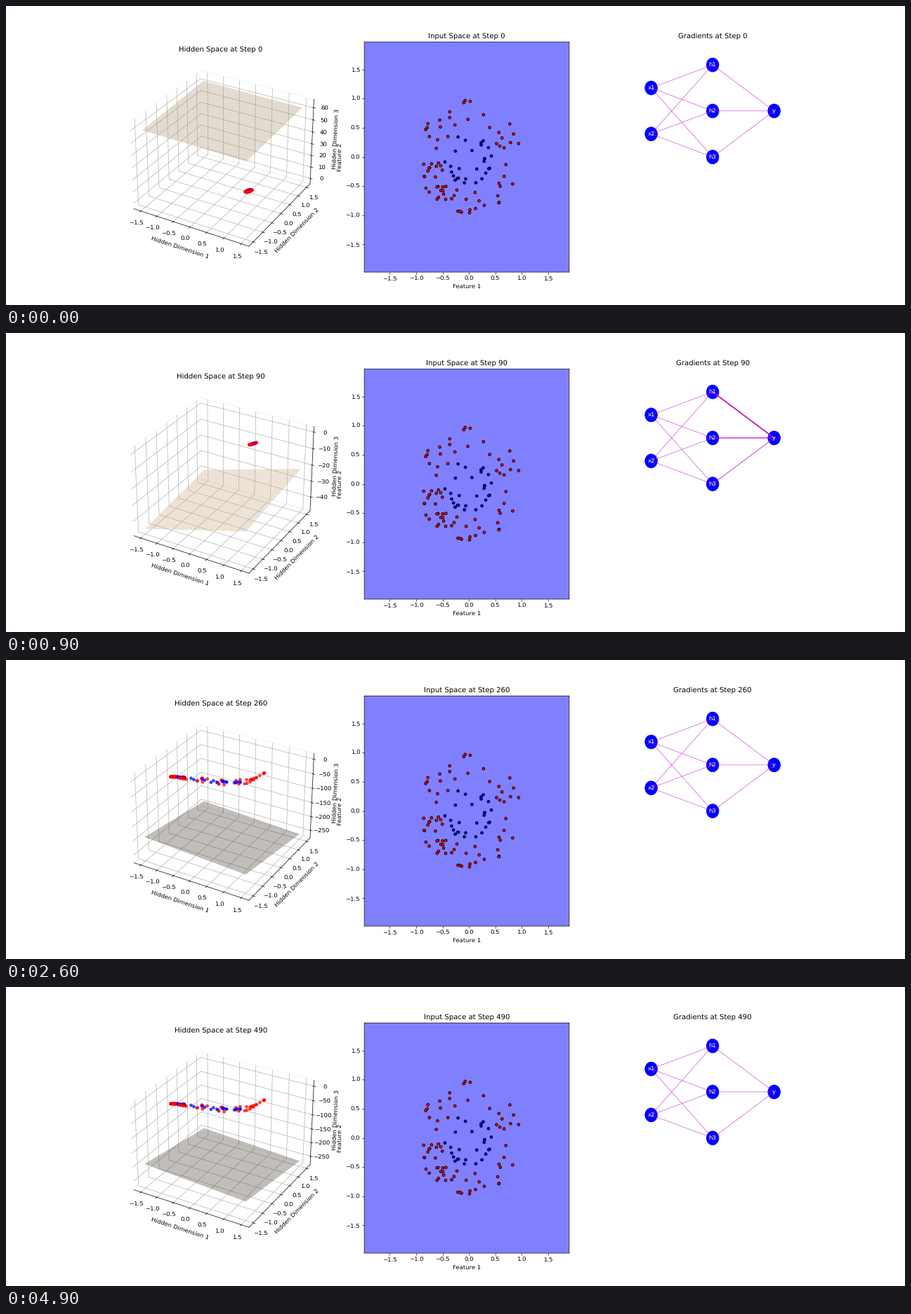
A matplotlib script that plays this animation: 1280 by 427 pixels, repeating every 5000 ms.

```python
import numpy as np
import matplotlib.pyplot as plt
from matplotlib.animation import FuncAnimation

W, H, DPI = 1280, 427, 1280 / 21
FRAMES, INTERVAL, STEP = 50, 100, 10
N_INNER, N_OUTER = 28, 72
THIN = .55
SPAN = 1.719

plt.rcParams.update({'text.hinting': 'none', 'path.snap': False})

# Training milestones; between them the network weights are blended
STEPS = [0, 90, 130, 180, 490]
# Decision plane z = (A + Bx + Cy) / D
PLANE = np.array([(1, -.006, .0165, .0166),
                  (1, -.177, -.0627, -.0299),
                  (-.6, -.113, -.155, -.1008),
                  (-1, -.0298, -.0688, .00448),
                  (-1, -.0298, -.0688, .00438)])
# Gain and offset of the three hidden units
EARLY = (.1, .67, .11, .343, .06, 0)
LATE = (2.4, -.1, 1.38, -.9, .5, 1.6)
UNITS = np.array([EARLY,
                  (.1, .80, .11, .375, .06, 0),
                  (1.85, -.97, .78, -.94, .5, 1.6),
                  LATE, LATE])


def blend(step, rows):
    if step < STEPS[1]:
        step = STEPS[1] * (step / STEPS[1]) ** 2.28
    return np.array([np.interp(step, STEPS, col) for col in rows.T])


def ring(rng, n, inner, outer):
    """Random points on a ring, denser toward the lower left."""
    r = np.sqrt(rng.uniform(inner ** 2, outer ** 2, n))
    t = rng.uniform(0, 2 * np.pi, n)
    t -= .3 * np.sin(t - np.radians(235))
    return np.column_stack([r * np.cos(t), r * np.sin(t)])


def hidden(step):
    spread = 30 * max(0, 1 - step / 130)
    angles = np.radians([40 - spread, 30 + spread, 40])
    gains = blend(step, UNITS).reshape(3, 2)
    return [np.tanh(gain * (points @ [np.cos(a), np.sin(a)]) + offset)
            for a, (gain, offset) in zip(angles, gains)]


def edge_widths(step):
    """Gradient burst that peaks at step 90 and fades by step 180."""
    burst = np.interp(step, [60, 90, 130, 180], [0, 1, .3, 0])
    return THIN + burst * np.array([1.4, .85, .3])


def draw_input():
    ax_in.set_facecolor((.5, .5, 1))
    ax_in.scatter(*points.T, c=colors, s=20, edgecolors='k')
    ax_in.set(xlim=(-1.983, 1.9), ylim=(-1.975, 1.972),
              xlabel='Feature 1', ylabel='Feature 2')


def draw_network():
    nodes = {'x1': (.2, .8), 'x2': (.2, .6), 'h1': (.5, .9),
             'h2': (.5, .7), 'h3': (.5, .5), 'y': (.8, .7)}
    ax_net.set(xlim=(0, 1), ylim=(0, 1))
    ax_net.axis('off')
    for name, pos in nodes.items():
        ax_net.add_patch(plt.Circle(pos, .03, color='blue'))
        ax_net.text(*pos, name, color='white', ha='center', va='center')

    def edge(a, b):
        return ax_net.plot(*zip(nodes[a], nodes[b]), 'm-', lw=THIN)[0]

    units = ['h1', 'h2', 'h3']
    for h in units:
        edge('x1', h)
        edge('x2', h)
    return [edge(h, 'y') for h in units]


rng = np.random.default_rng(4)
points = np.vstack([ring(rng, N_OUTER, .5, .98), ring(rng, N_INNER, 0, .48)])
colors = ['red'] * N_OUTER + ['blue'] * N_INNER

fig = plt.figure(figsize=((W + .001) / DPI, (H + .001) / DPI), dpi=DPI)
ax_hid = fig.add_subplot(131, projection='3d', computed_zorder=False)
ax_in = fig.add_subplot(132)
ax_net = fig.add_subplot(133)

ax_hid.set(xlabel='Hidden Dimension 1', ylabel='Hidden Dimension 2',
           zlabel='Hidden Dimension 3')
for axis in (ax_hid.xaxis, ax_hid.yaxis, ax_hid.zaxis):
    axis.pane.fill = False
draw_input()
out_edges = draw_network()
gx, gy = np.meshgrid([-1.5, 1.5], [-1.5, 1.5])


def update(i):
    step = i * STEP
    for artist in list(ax_hid.collections):
        artist.remove()

    a, b, c, d = blend(step, PLANE)
    gz = (a + b * gx + c * gy) / d
    hx, hy, hz = hidden(step)
    ax_hid.plot_surface(gx, gy, gz, color='tan', alpha=.34, linewidth=0)
    ax_hid.scatter(hx, hy, hz, c=colors, s=20, alpha=.7,
                   depthshade=False, zorder=3)
    low, high = min(gz.min(), hz.min()), max(gz.max(), hz.max())
    pad = (high - low) * (.05 + 1.1 / 48)
    ax_hid.set(xlim=(-SPAN, SPAN), ylim=(-SPAN, SPAN),
               zlim=(low - pad, high + pad))

    for line, width in zip(out_edges, edge_widths(step)):
        line.set_linewidth(width)
    for ax, name in ((ax_hid, 'Hidden Space'), (ax_in, 'Input Space'),
                     (ax_net, 'Gradients')):
        ax.set_title(f'{name} at Step {step}')
    return []


anim = FuncAnimation(fig, update, frames=FRAMES, interval=INTERVAL,
                     repeat=True, repeat_delay=0, blit=False)
plt.show()
```
